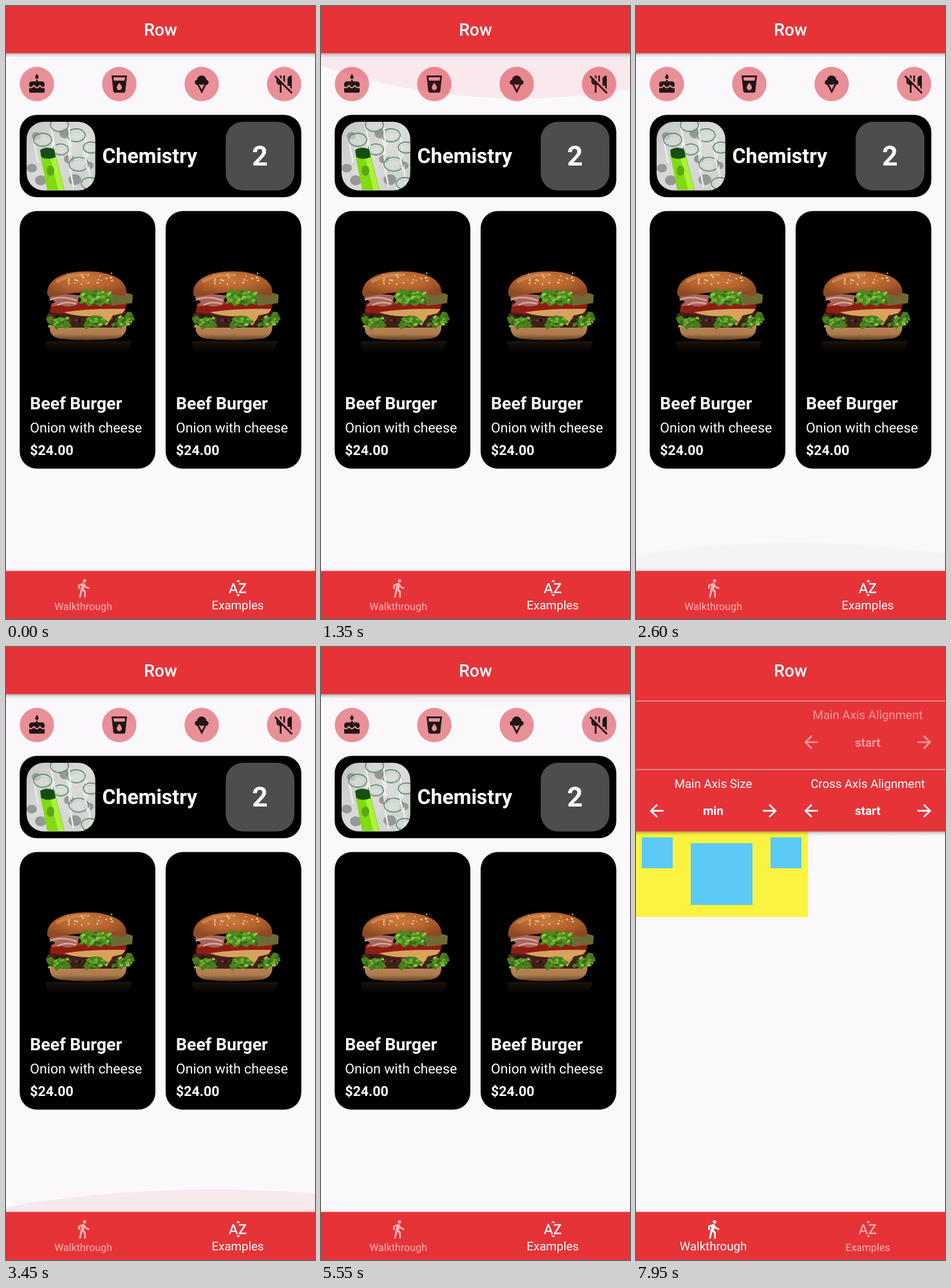
Recreate the animation shown at these times as an HTML page. Size 480 by 953 pixels, loop 8000 ms.

```html
<!DOCTYPE html>
<html lang="en">
<head>
<meta charset="utf-8">
<title>Row</title>
<style>
html, body { margin: 0; width: 100%; height: 100%; overflow: hidden; background: #fbf8fc; }
svg { display: block; width: 100%; height: 100%; font-family: Roboto, sans-serif; text-rendering: geometricPrecision; }
.mid { text-anchor: middle; }
.bold { font-weight: 700; }
</style>
</head>
<body>
<svg viewBox="0 0 480 953">
  <defs>
    <linearGradient id="shade" x2="0" y2="1">
      <stop offset="0" stop-color="#000" stop-opacity=".32"/>
      <stop offset=".4" stop-color="#000" stop-opacity=".12"/>
      <stop offset="1" stop-color="#000" stop-opacity="0"/>
    </linearGradient>
    <radialGradient id="bun" cx=".48" cy=".35" r=".62">
      <stop offset="0" stop-color="#c87a3c"/>
      <stop offset=".5" stop-color="#b9652f"/>
      <stop offset="1" stop-color="#8d4a24"/>
    </radialGradient>
    <linearGradient id="base" x2="0" y2="1">
      <stop offset="0" stop-color="#b88757"/>
      <stop offset=".6" stop-color="#ad7a4b"/>
      <stop offset="1" stop-color="#5f3c22"/>
    </linearGradient>
    <linearGradient id="mirror" x2="0" y2="1">
      <stop offset="0" stop-color="#1b130d"/>
      <stop offset="1" stop-color="#000"/>
    </linearGradient>
    <linearGradient id="lab" x2="1" y2="1">
      <stop offset="0" stop-color="#c4c5c4"/>
      <stop offset=".5" stop-color="#dadbda"/>
      <stop offset="1" stop-color="#cccecc"/>
    </linearGradient>
    <clipPath id="body"><rect y="73.3" width="480" height="805"/></clipPath>
    <clipPath id="thumb"><rect x="32" y="180" width="106.7" height="106.7" rx="26.7"/></clipPath>

    <g id="burger">
      <path d="M62 521H196L188 540H66Z" fill="url(#mirror)"/>
      <path d="M68 496Q66 513 82 517Q125 522 172 517Q188 513 187 496Z" fill="url(#base)"/>
      <path d="M62 484Q64 474 82 474H176Q192 476 190 490Q186 501 160 500H86Q64 498 62 484Z" fill="#3f2019"/>
      <g id="crumbs"/>
      <path d="M70 462Q125 456 188 462L184 477Q125 484 68 476Z" fill="#8f1d13"/>
      <path d="M90 476Q130 470 186 471L180 478L166 481L156 497L141 482Q110 484 90 476Z" fill="#d9a25d"/>
      <path d="M158 448Q182 442 197 449L196 462L164 466Z" fill="#6f6a35"/>
      <path d="M66 453Q80 445 114 450L111 464Q98 470 86 465L70 467L76 460Z" fill="#a5655a"/>
      <path d="M68 457Q86 449 110 458M80 465Q92 458 109 463" fill="none" stroke="#d5a595" stroke-width="2.5"/>
      <path d="M64 447C64 425 88 412.5 126 412.5C164 412.5 187 426 187 444Q188 452 176 450Q125 440 78 451Q64 454 64 447Z" fill="url(#bun)"/>
      <path d="M80 428Q100 416 128 418" fill="none" stroke="#e3a76d" stroke-width="5" stroke-linecap="round" opacity=".45"/>
      <g id="seeds"/>
      <path d="M112 452L119 443L124 439L132 444L140 440L148 444L158 443L161 449L167 454L161 459L162 465L153 462L147 467L138 463L128 467L122 460L113 464L117 456Z" fill="#4b8a20"/>
      <path d="M62 485L70 481L76 487L88 485L98 491L102 498L94 501L85 498L78 504L73 495L65 493Z M120 496L126 487L136 481L147 482L154 487L159 491L151 495L143 500L133 498L124 503Z M164 494L176 489L184 484L188 475L195 476L198 482L200 488L192 492L184 496L178 502L171 496L165 500Z" fill="#477f1c"/>
      <g id="leaves"/>
    </g>

    <g id="card">
      <rect x="21.3" y="318.7" width="210.7" height="400.5" rx="26.7"/>
      <use href="#burger"/>
      <g fill="#fff">
        <text class="bold" x="37.3" y="626.6" font-size="26.67">Beef Burger</text>
        <text x="37.3" y="662.5" font-size="21.33">Onion with cheese</text>
        <text class="bold" x="37.3" y="698.2" font-size="21.33">$24.00</text>
      </g>
    </g>
    <path id="back" d="M20 11H7.83l5.59-5.59L12 4l-8 8 8 8 1.41-1.41L7.83 13H20v-2z"/>
    <path id="next" d="M12 4l-1.41 1.41L16.17 11H4v2h12.17l-5.58 5.59L12 20l8-8z"/>
  </defs>

  <rect width="480" height="953" fill="#fbf8fc"/>

  <g id="examples">
    <g id="chips"></g>
    <rect x="21.3" y="169.3" width="437.4" height="127.9" rx="26.7"/>
    <g clip-path="url(#thumb)">
      <rect x="32" y="180" width="107" height="107" fill="url(#lab)"/>
      <g id="tubes"></g>
      <path d="M53 229L76 226L91 286H64Z" fill="#7fdc0e"/>
      <path d="M68 232L76 230L90 286H81Z" fill="#aef03c"/>
      <path d="M53 224Q63 217 75 223L77 235Q65 240 55 235Z" fill="#174d12"/>
      <ellipse cx="69" cy="256" rx="6" ry="8" fill="#5ca814"/>
    </g>
    <text class="bold" x="149.5" y="243.8" font-size="32" fill="#fff">Chemistry</text>
    <rect x="341.3" y="180" width="106.7" height="106.7" rx="26.7" fill="#4f4c50"/>
    <text class="mid bold" x="394.6" y="248" font-size="42.67" fill="#fff">2</text>
    <use href="#card"/>
    <use href="#card" x="226.7"/>
    <g id="glows" clip-path="url(#body)"></g>
  </g>

  <g id="walkthrough">
    <rect y="286.7" width="267.3" height="133" fill="#fcf340"/>
    <g fill="#5ccaf7">
      <rect x="9" y="296" width="48" height="48"/>
      <rect x="85" y="305" width="96" height="96"/>
      <rect x="209" y="296" width="48" height="48"/>
    </g>
  </g>

  <rect id="bar" width="480" fill="#e63338"/>
  <rect id="barShade" width="480" height="7" fill="url(#shade)"/>
  <text class="mid" x="240" y="45.8" font-size="26.67" font-weight="500" fill="#fff">Row</text>
  <g id="options" fill="#fff">
    <path d="M0 84H480M0 190.5H480" stroke="#fff" stroke-opacity=".55" stroke-width="1.33"/>
  </g>

  <rect y="875" width="480" height="3.5" fill="#000" opacity=".04"/>
  <rect y="878.3" width="480" height="74.7" fill="#e63338"/>
  <g id="tabs" fill="#fff"></g>
</svg>

<script>
const LOOP = 8000, SWITCH = 7050, LABEL_TIME = 200;
const TOP = 73.3, BOTTOM = 878.3;
const $ = id => document.getElementById(id);
const clamp = v => Math.min(1, Math.max(0, v));
const easeOut = v => 1 - (1 - clamp(v)) ** 2;

function add(parent, tag, attrs, text) {
  const el = document.createElementNS('http://www.w3.org/2000/svg', tag);
  set(el, attrs);
  if (text) el.textContent = text;
  return parent.appendChild(el);
}
function set(el, attrs) {
  for (const key in attrs) el.setAttribute(key, attrs[key]);
}
function randomizer(seed) {
  return () => (seed = seed * 16807 % 2147483647) / 2147483647;
}
// A 24-unit icon drawn in a 32 px box around (x, y).
const iconAt = (x, y) => `translate(${x - 16} ${y - 16}) scale(1.3333)`;

const chipIcons = [
  'M12 6c1.11 0 2-.9 2-2 0-.38-.1-.73-.29-1.03L12 0l-1.71 2.97c-.19.3-.29.65-.29 1.03 0 1.1.9 2 2 2zm4.6 9.99l-1.07-1.07-1.08 1.07c-1.3 1.3-3.58 1.31-4.89 0l-1.07-1.07-1.09 1.07C6.75 16.64 5.88 17 4.96 17c-.73 0-1.4-.23-1.96-.61V21c0 .55.45 1 1 1h16c.55 0 1-.45 1-1v-4.61c-.56.38-1.23.61-1.96.61-.92 0-1.79-.36-2.44-1.01zM18 9h-5V7h-2v2H6c-1.66 0-3 1.34-3 3v1.54c0 1.08.88 1.96 1.96 1.96.52 0 1.02-.2 1.38-.57l2.14-2.13 2.13 2.13c.74.74 2.03.74 2.77 0l2.14-2.13 2.13 2.13c.37.37.86.57 1.38.57 1.08 0 1.96-.88 1.96-1.96V12C21 10.34 19.66 9 18 9z',
  'M3 2l2.01 18.23C5.13 21.23 5.97 22 7 22h10c1.03 0 1.87-.77 1.99-1.77L21 2H3zm9 17c-1.66 0-3-1.34-3-3 0-2 3-5.4 3-5.4s3 3.4 3 5.4c0 1.66-1.34 3-3 3zm6.33-11H5.67l-.44-4h13.55l-.45 4z',
  'M8.79 12.4l3.26 6.22 3.17-6.21c-.11-.08-.21-.16-.3-.25-.88.53-1.87.84-2.92.84s-2.04-.31-2.92-.85c-.09.09-.19.17-.29.25zm-1.96.59C5.25 12.9 4 11.6 4 10c0-1.49 1.09-2.73 2.52-2.96C6.75 4.22 9.12 2 12 2s5.25 2.22 5.48 5.04C18.91 7.27 20 8.51 20 10c0 1.59-1.24 2.9-2.81 2.99L12.07 23 6.83 12.99z',
  'M16 14V6c0-1.76 2.24-4 5-4v16.17l-2-2V14h-3zm4.49 9.31L10.02 12.85c-.33.09-.66.15-1.02.15v9H7v-9c-2.21 0-4-1.79-4-4V5.83L.69 3.51 2.1 2.1l19.8 19.8-1.41 1.41zM6.17 9L5 7.83V9h1.17zM9 2H7v2.17l2 2V2zm4 7V2h-2v6.17l1.85 1.85c.09-.33.15-.67.15-1.02z'
];
chipIcons.forEach((d, i) => {
  const x = 48 + 128 * i;
  add($('chips'), 'circle', { cx: x, cy: 121.3, r: 26.7, fill: '#e98f98' });
  add($('chips'), 'path', { d, transform: iconAt(x, 121.3), fill: '#1f1514' });
});

// Random small ovals inside a box give the food its grain.
const rand = randomizer(77);
function scatter(id, count, [x, y, width, height], size, colors) {
  for (let i = 0; i < count; i++) {
    const cx = x + rand() * width, cy = y + rand() * height, rx = size * (.6 + rand() * .8);
    add($(id), 'ellipse', {
      cx, cy, rx, ry: rx * .6, fill: colors[i % colors.length],
      transform: `rotate(${rand() * 90 - 45} ${cx} ${cy})`
    });
  }
}
const greens = ['#6fae2e', '#35691a', '#8fc644', '#4f9420'];
scatter('seeds', 24, [96, 415, 70, 18], 1.6, ['#ecc895']);
scatter('crumbs', 55, [66, 477, 118, 20], 2.4, ['#6b3a2c', '#250f0c', '#522a1f']);
scatter('leaves', 45, [117, 444, 45, 18], 2.8, greens);
scatter('leaves', 18, [67, 485, 30, 13], 2.6, greens);
scatter('leaves', 20, [125, 484, 29, 13], 2.6, greens);
scatter('leaves', 18, [170, 482, 26, 13], 2.6, greens);

const blots = [[40, 252, 8], [54, 271, 9], [47, 202, 7], [107, 270, 10], [92, 198, 9], [129, 248, 7], [98, 238, 8]];
blots.forEach(([cx, cy, r]) => add($('tubes'), 'ellipse', { cx, cy, rx: r, ry: r * .85, fill: '#969896' }));
const rims = [[57, 208, 14], [85, 223, 12], [113, 246, 15], [109, 201, 14], [83, 185, 14], [132, 220, 12], [130, 276, 13]];
rims.forEach(([cx, cy, r]) => {
  add($('tubes'), 'path', { d: `M${cx - r} ${cy}l7 36M${cx + r} ${cy}l4 34`, stroke: '#eceeec', 'stroke-width': 2.5 });
  add($('tubes'), 'ellipse', { cx, cy, rx: r, ry: r * .72, fill: '#dde0dd', 'fill-opacity': .5, stroke: '#5f8c67', 'stroke-width': 1.6 });
  add($('tubes'), 'ellipse', { cx, cy: cy + 1, rx: r - 3, ry: r * .72 - 3, fill: 'none', stroke: '#b9d2bd', 'stroke-width': 1 });
});

function option(x, y, title, value, opacity) {
  const g = add($('options'), 'g', { opacity, 'font-size': 18.67 });
  add(g, 'text', { class: 'mid', x, y: y - 36 }, title);
  add(g, 'text', { class: 'mid bold', x, y: y + 6.7 }, value);
  add(g, 'use', { href: '#back', transform: iconAt(x - 88, y) });
  add(g, 'use', { href: '#next', transform: iconAt(x + 88, y) });
}
option(360, 148, 'Main Axis Alignment', 'start', .5);
option(120, 254.7, 'Main Axis Size', 'min', 1);
option(360, 254.7, 'Cross Axis Alignment', 'start', 1);

function tab(x, name, d) {
  const g = add($('tabs'), 'g', {});
  add(g, 'path', { d, transform: iconAt(x, 905) });
  return { g, label: add(g, 'text', { class: 'mid', x }, name) };
}
const walkTab = tab(120, 'Walkthrough', 'M13.5 5.5c1.1 0 2-.9 2-2s-.9-2-2-2-2 .9-2 2 .9 2 2 2zM9.8 8.9L7 23h2.1l1.8-8 2.1 2v6h2v-7.5l-2.1-2 .6-3C14.8 12 16.8 13 19 13v-2c-1.9 0-3.5-1-4.3-2.4l-1-1.6c-.4-.6-1-1-1.7-1-.3 0-.5.1-.8.1L6 8.3V13h2V9.6l1.8-.7');
const examplesTab = tab(360, 'Examples', 'M14.94 4.66h-4.72l2.36-2.36zm-4.69 14.71h4.66l-2.33 2.33zM6.1 6.27L1.6 17.73h1.84l.92-2.45h5.11l.92 2.45h1.84L7.74 6.27H6.1zm-1.13 7.37l1.94-5.18 1.94 5.18H4.97zM15.73 16.14h6.12v1.59h-8.53v-1.29l5.92-8.56h-5.88v-1.6h8.3v1.26l-5.93 8.6z');

function showTab({ g, label }, active) {
  g.setAttribute('opacity', .62 + .38 * active);
  set(label, { y: 939 - active, 'font-size': 16 + 2.67 * active });
}

// Overscroll glows: a wide circle squashed against the list edge.
const RADIUS = 720, DEPTH = 96.5;
const PINK = '#e63338', GRAY = '#707470';
const glows = [
  { edge: TOP, start: 1000, full: 1300, release: 1550, end: 2100, size: .73, x: 310, alpha: .075, fill: PINK },
  { edge: BOTTOM, start: 2250, full: 2450, release: 2600, end: 2950, size: .46, x: 245, alpha: .035, fill: GRAY },
  { edge: BOTTOM, start: 3100, full: 3400, release: 3500, end: 3950, size: .36, x: 322, alpha: .075, fill: PINK },
  { edge: TOP, start: 4100, full: 4500, release: 5250, end: 5850, size: .73, x: 290, alpha: .075, fill: PINK },
  { edge: TOP, start: 4200, full: 4600, release: 5250, end: 5850, size: .53, x: 330, alpha: .05, fill: GRAY }
];
for (const glow of glows) glow.el = add($('glows'), 'ellipse', { cx: glow.x, rx: RADIUS, fill: glow.fill });

function showGlow(glow, t) {
  const level = easeOut((t - glow.start) / (glow.full - glow.start)) *
    (1 - easeOut((t - glow.release) / (glow.end - glow.release)));
  const scale = glow.size * level;
  const away = (RADIUS - DEPTH) * scale;
  set(glow.el, {
    cy: glow.edge === TOP ? TOP - away : BOTTOM + away,
    ry: RADIUS * scale,
    opacity: glow.alpha * level
  });
}

function draw(t) {
  const walking = t >= SWITCH;
  const active = easeOut((t - SWITCH) / LABEL_TIME);
  const barHeight = walking ? 286.7 : TOP;
  $('examples').setAttribute('display', walking ? 'none' : 'inline');
  for (const id of ['walkthrough', 'options']) $(id).setAttribute('display', walking ? 'inline' : 'none');
  $('bar').setAttribute('height', barHeight);
  $('barShade').setAttribute('y', barHeight);
  showTab(walkTab, active);
  showTab(examplesTab, 1 - active);
  for (const glow of glows) showGlow(glow, t);
}

const begin = performance.now();
function tick() {
  draw((performance.now() - begin) % LOOP);
  requestAnimationFrame(tick);
}
tick();
</script>
</body>
</html>
```
